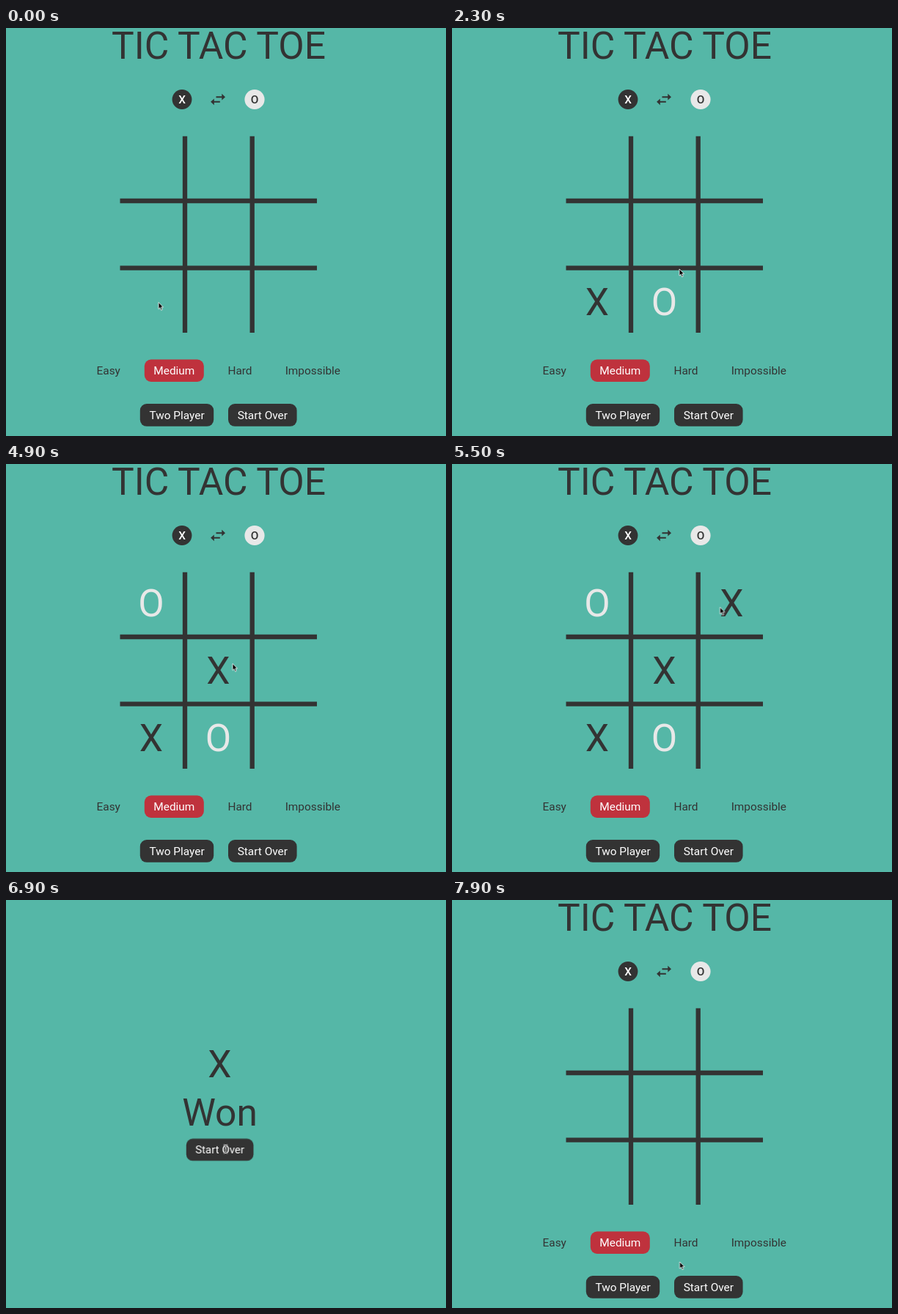
Recreate the animation shown at these times as an HTML page. Size 600 px wide and 557 px high, loop 8 s.

```html
<!DOCTYPE html>
<html lang="en">
<head>
<meta charset="utf-8">
<title>Tic Tac Toe</title>
<style>
html, body { margin: 0; width: 100%; height: 100%; overflow: hidden; background: #55b7a7; }
svg { display: block; width: 100%; height: 100%; font: 15.4px Roboto, sans-serif; text-anchor: middle; }
.dark { fill: #333; }
.light { fill: #e8e8e8; }
.red { fill: #bf323d; }
.big { font-size: 51.5px; }
.badge { font-weight: 500; }
.label { fill: #fff; }
.grid { stroke: #333; stroke-width: 6.3; }

/* One loop is 8 s; every change lands on a 100 ms tick (1.25%). */
.anim { animation: 8s step-end infinite; }
.game { animation-name: game; }
.won { animation-name: won; }
.hover { animation-name: hover; transform-box: fill-box; transform-origin: center; }
.x1 { animation-name: x1; }
.o1 { animation-name: o1; }
.x2 { animation-name: x2; }
.o2 { animation-name: o2; }
.x3 { animation-name: x3; }
.cursor { animation-name: move; }
.arrow { animation-name: arrow; }
.beam { animation-name: beam; }

@keyframes game { 0% { opacity: 1 } 71.25% { opacity: 0 } 87.5%, 100% { opacity: 1 } }
@keyframes won { 0% { opacity: 0 } 71.25% { opacity: 1 } 87.5%, 100% { opacity: 0 } }
@keyframes hover { 0% { transform: scale(1) } 81.25% { transform: scale(.98) } 87.5%, 100% { transform: scale(1) } }

@keyframes x1 { 0% { opacity: 0 } 2.5% { opacity: 1 } 71.25%, 100% { opacity: 0 } }
@keyframes o1 { 0% { opacity: 0 } 25% { opacity: 1 } 71.25%, 100% { opacity: 0 } }
@keyframes x2 { 0% { opacity: 0 } 37.5% { opacity: 1 } 71.25%, 100% { opacity: 0 } }
@keyframes o2 { 0% { opacity: 0 } 61.25% { opacity: 1 } 71.25%, 100% { opacity: 0 } }
@keyframes x3 { 0% { opacity: 0 } 67.5% { opacity: 1 } 71.25%, 100% { opacity: 0 } }

@keyframes move {
  0% { transform: translate(208px, 374.5px) }
  12.5% { transform: translate(208px, 374.5px); animation-timing-function: steps(8) }
  22.5% { transform: translate(296px, 338px); animation-timing-function: steps(5) }
  28.75% { transform: translate(310px, 329px) }
  32.5% { transform: translate(310px, 329px); animation-timing-function: steps(4) }
  37.5% { transform: translate(291.7px, 284px) }
  61.25% { transform: translate(309px, 272.5px); animation-timing-function: steps(5) }
  67.5% { transform: translate(365.5px, 195.5px) }
  75% { transform: translate(365.5px, 195.5px); animation-timing-function: steps(5) }
  81.25% { transform: translate(299.5px, 340px) }
  87.5% { transform: translate(299.5px, 340px); animation-timing-function: steps(7) }
  96.25% { transform: translate(268.5px, 483px) }
  97.5% { transform: translate(292px, 484px) }
  98.75%, 100% { transform: translate(310.5px, 494px) }
}
@keyframes arrow {
  0% { opacity: 1 } 2.5% { opacity: 0 } 13.75% { opacity: 1 }
  38.75% { opacity: 0 } 61.25% { opacity: 1 }
  83.75% { opacity: 0 } 87.5%, 100% { opacity: 1 }
}
@keyframes beam {
  0% { opacity: 0 } 2.5% { opacity: 1 } 13.75% { opacity: 0 }
  38.75% { opacity: 1 } 61.25% { opacity: 0 }
  83.75% { opacity: 1 } 87.5%, 100% { opacity: 0 }
}
</style>
</head>
<body>
<svg viewBox="0 0 600 557">
  <g class="anim game">
    <text class="big dark" x="290" y="42.3">TIC TAC TOE</text>

    <g class="badge">
      <circle class="dark" cx="240" cy="97.5" r="13.4"/>
      <text class="label" x="240" y="103">X</text>
      <circle class="light" cx="339" cy="97.5" r="13.6"/>
      <text class="dark" x="339" y="103">O</text>
    </g>
    <path class="dark" d="M286.5 93.2h7.8v-3.4l4.7 4.4-4.7 4.4v-3.3h-7.8z M291.8 99.7h-8v-3.3l-4.7 4.4 4.7 4.4v-3.4h8z"/>

    <path class="grid" d="M244 147.7V416 M335.7 147.7V416 M155.5 236H424 M155.5 327.6H424"/>

    <g class="big">
      <text class="anim dark x1" x="198" y="392">X</text>
      <text class="anim light o1" x="289.5" y="392">O</text>
      <text class="anim dark x2" x="289.5" y="300">X</text>
      <text class="anim light o2" x="198" y="208.3">O</text>
      <text class="anim dark x3" x="381.5" y="208.3">X</text>
    </g>

    <rect class="red" x="188.8" y="452.5" width="81" height="30.5" rx="9"/>
    <text class="dark" x="139.7" y="473.3">Easy</text>
    <text class="label" x="229.3" y="473.3">Medium</text>
    <text class="dark" x="319" y="473.3">Hard</text>
    <text class="dark" x="418.3" y="473.3">Impossible</text>

    <rect class="dark" x="182.8" y="513" width="100.4" height="30.8" rx="9"/>
    <text class="label" x="233" y="533.7">Two Player</text>
    <rect class="dark" x="303" y="513" width="93.6" height="30.8" rx="9"/>
    <text class="label" x="349.8" y="533.7">Start Over</text>
  </g>

  <g class="anim won">
    <text class="big dark" x="291.5" y="241.5">X</text>
    <text class="big dark" x="291.5" y="308">Won</text>
    <g class="anim hover">
      <rect class="dark" x="244.8" y="325.5" width="93.6" height="30.8" rx="9"/>
      <text class="label" x="291.6" y="346.4">Start Over</text>
    </g>
  </g>

  <g class="anim cursor">
    <path class="anim arrow" d="M0 0V9.2L2.1 7.3 3.6 10.8 5.2 10.1 3.7 6.7H6.5Z" fill="#000" stroke="#fff" stroke-width=".8"/>
    <g class="anim beam" fill="none">
      <path d="M-2.6-5.4Q0-5.4 0-3.8 0-5.4 2.6-5.4M0-4V4M-2.6 5.4Q0 5.4 0 3.8 0 5.4 2.6 5.4M-1.4 1.4H1.4" stroke="#fff" stroke-width="2.2"/>
      <path d="M-2.6-5.4Q0-5.4 0-3.8 0-5.4 2.6-5.4M0-4V4M-2.6 5.4Q0 5.4 0 3.8 0 5.4 2.6 5.4M-1.4 1.4H1.4" stroke="#333" stroke-width=".9"/>
    </g>
  </g>
</svg>
</body>
</html>
```
